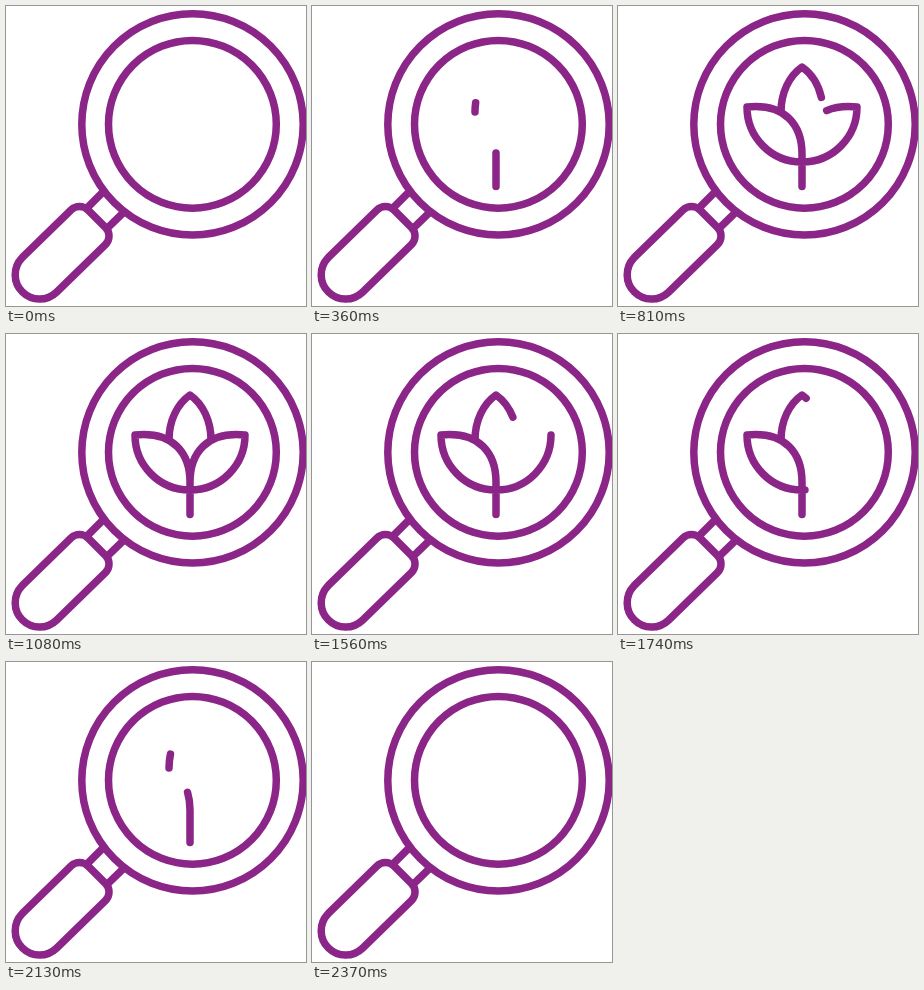
These frames come from a looping animation (300 px wide and 300 px high, 2.7 s). An HTML page:

```html
<!DOCTYPE html>
<html lang="en">
<head>
<meta charset="utf-8">
<title>Magnifier with growing plant</title>
<style>
html, body { margin: 0; width: 100%; height: 100%; overflow: hidden; background: #fff; }
svg { display: block; width: 100%; height: 100%; }
</style>
</head>
<body>
<svg viewBox="0 0 300 300" fill="none" stroke="#8b2588" stroke-width="7.5" stroke-linecap="round" stroke-linejoin="round">
  <circle cx="186.5" cy="118.4" r="110.7"/>
  <circle cx="186.4" cy="118.3" r="83.9"/>
  <path stroke-linecap="butt" d="M97 186L80 203M118 206L101 222.5"/>
  <path d="M82 204L99.5 221.5A12 12 0 0 1 99.5 238.5L50.5 286.3A24.4 24.4 0 0 1 16 251.8L65 204A12 12 0 0 1 82 204Z"/>
  <path class="grow" pathLength="1" d="M184 180.5V148C184 120 168 97 129 101C129 131 153 156 184 156C215 156 239 131 239 101C200 97 184 120 184 148"/>
  <path class="grow" pathLength="1" d="M163 106C163 87 171 70 184 61C197 70 205 87 205 106"/>
</svg>
<script>
const LOOP = 2700, STEP = 30;
const strokes = document.querySelectorAll('.grow');

// [time in ms, drawn share of each stroke]
const draw = [[220, 0], [360, .09], [600, .5], [750, .785], [900, .93], [1080, 1]];
const erase = [[1380, 1], [1560, .775], [1920, .35], [2370, 0]];

// Smooth curve through the keys, at rest at both ends
function ease(keys, t) {
  const last = keys.length - 1;
  if (t <= keys[0][0]) return keys[0][1];
  if (t >= keys[last][0]) return keys[last][1];
  const slope = i => i === 0 || i === last ? 0 :
    (keys[i + 1][1] - keys[i - 1][1]) / (keys[i + 1][0] - keys[i - 1][0]);
  const i = keys.findIndex(k => k[0] > t) - 1;
  const [t0, a] = keys[i], [t1, b] = keys[i + 1];
  const d = t1 - t0, u = (t - t0) / d, v = 1 - u;
  return a * v * v * (1 + 2 * u) + b * u * u * (1 + 2 * v)
    + d * u * v * (slope(i) * v - slope(i + 1) * u);
}

function render() {
  const t = Math.floor(performance.now() % LOOP / STEP) * STEP;
  const share = t < 1250 ? ease(draw, t) : ease(erase, t);
  for (const s of strokes) {
    s.style.visibility = share > 0 ? 'visible' : 'hidden';
    s.setAttribute('stroke-dasharray', share < 1 ? `${share} 2` : 'none');
  }
  requestAnimationFrame(render);
}
render();
</script>
</body>
</html>
```
